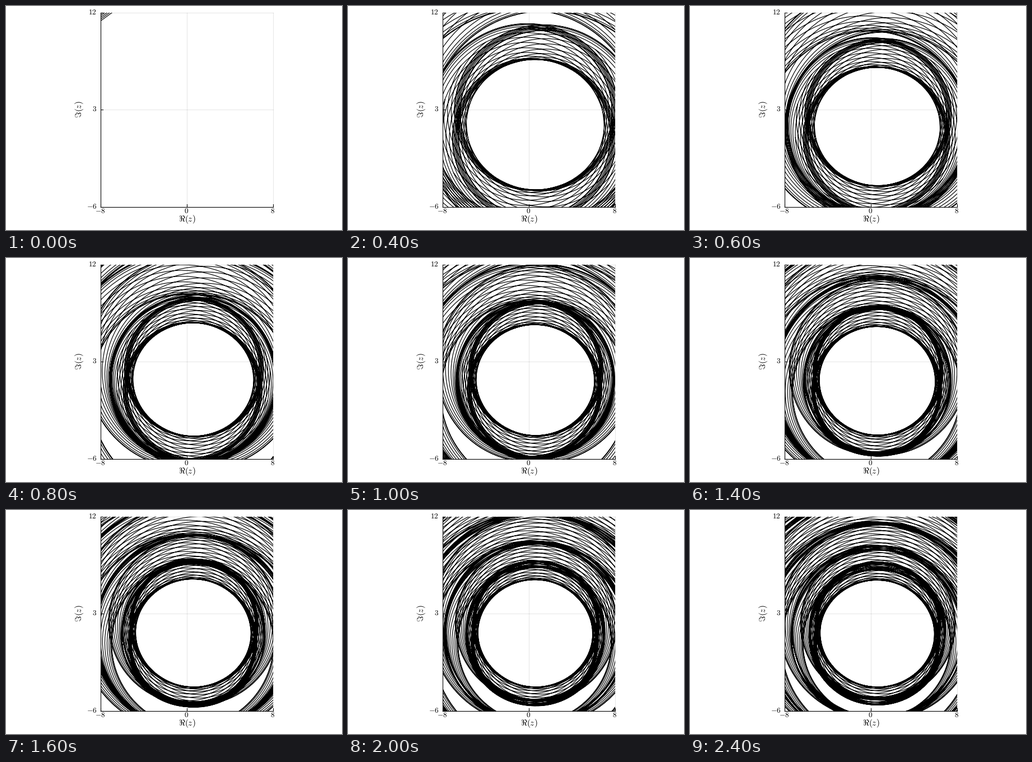
Recreate the animation shown at these times as a matplotlib script. Size 600x400 px, loop 3.45 s.

```python
import numpy as np
import matplotlib.pyplot as plt
from matplotlib.animation import FuncAnimation

plt.rcParams["mathtext.fontset"] = "cm"

W, H, DPI = 600, 400, 100
PX = 72 / DPI
LEFT, RIGHT, TOP, BOTTOM = 168.5, 476.5, 11.5, 358.5
MOVING_STEPS, TOTAL_STEPS, STEP_MS = 48, 69, 50
COPIES, SWAY_X, SWAY_Y, TILT = 16, 0.3, 0.65, -0.07

fig = plt.figure(figsize=(W / DPI, H / DPI), dpi=DPI, facecolor="white")
ax = fig.add_axes([LEFT / W, 1 - BOTTOM / H, (RIGHT - LEFT) / W, (BOTTOM - TOP) / H])
ax.set(xlim=(-8, 8), ylim=(-6, 12), xticks=[], yticks=[])
for side in ("top", "right"):
    ax.spines[side].set_visible(False)
for side in ("left", "bottom"):
    ax.spines[side].set(linewidth=1.1 * PX, zorder=5)

grid = dict(color="black", alpha=0.1, lw=PX, zorder=1, clip_on=False)
for x in (0, 8):
    ax.plot([x, x], [-6, 12], **grid)
for y in (3, 12):
    ax.plot([-8, 8], [y, y], **grid)

tick = dict(color="black", lw=1.1 * PX, zorder=5, clip_on=False)
for x in (-8, 0, 8):
    ax.plot([x, x], [-6, -5.75], **tick)
for y in (-6, 3, 12):
    ax.plot([-8, -7.75], [y, y], **tick)


def label(x, y, text, size=9.6, ha="center", rotation=0):
    fig.text(x / W, 1 - y / H, text, fontsize=size, ha=ha, va="center",
             rotation=rotation)


for x, text in ((168, "$-8$"), (322.5, "$0$"), (476.5, "$8$")):
    label(x, 366, text)
for y, text in ((11.5, "$12$"), (185, "$3$"), (358.5, "$-6$")):
    label(162, y, text, ha="right")
label(323, 381, r"$\Re(z)$", 11)
label(131, 185, r"$\Im(z)$", 11, rotation=90)

curve, = ax.plot([], [], color="black", lw=0.85, zorder=3)

# Copies crowd towards both ends of the fan, which gives its dark edges.
FAN = np.pi / 2 + np.pi / 10
PHASE = FAN * np.sin(np.linspace(-np.pi / 2, np.pi / 2, COPIES))[:, None]
TURN = np.linspace(-np.pi, 12 * np.pi, 620)[None, :]


def join(strands):
    """Chain separate strands into one path with gaps between them."""
    gap = np.full((len(strands), 1), np.nan + 0j)
    return np.hstack([strands, gap]).ravel()


def corner_lines():
    start = -8 + 1j * np.linspace(11.2, 11.85, 5)[:, None]
    return join(start + np.array([[0, 2 + 1.45j]]))


def spirals(order):
    """Two mirrored fans of spirals that tighten as the order grows."""
    radius = 5.55 + 100 / (order ** 2 + 8)
    growth = 18 / (order + 1.5)
    r = radius + growth * (np.abs(TURN) / np.pi) ** 1.5
    r = np.where(r < 22, r, np.nan)
    sway = SWAY_X * np.cos(PHASE) + 1j * SWAY_Y * np.sin(PHASE)
    fan = r * np.exp(1j * (TURN + PHASE)) - sway
    both = np.vstack([fan, -fan.conj()])
    centre = 0.62 + 1j * (1.05 + 5 / order)
    return join(centre + both * np.exp(1j * TILT))


def update(i):
    step = min(i, MOVING_STEPS)
    z = spirals(step + 1) if step else corner_lines()
    curve.set_data(z.real, z.imag)
    return curve,


anim = FuncAnimation(fig, update, frames=TOTAL_STEPS, interval=STEP_MS,
                     repeat=True, repeat_delay=0)
plt.show()
```
